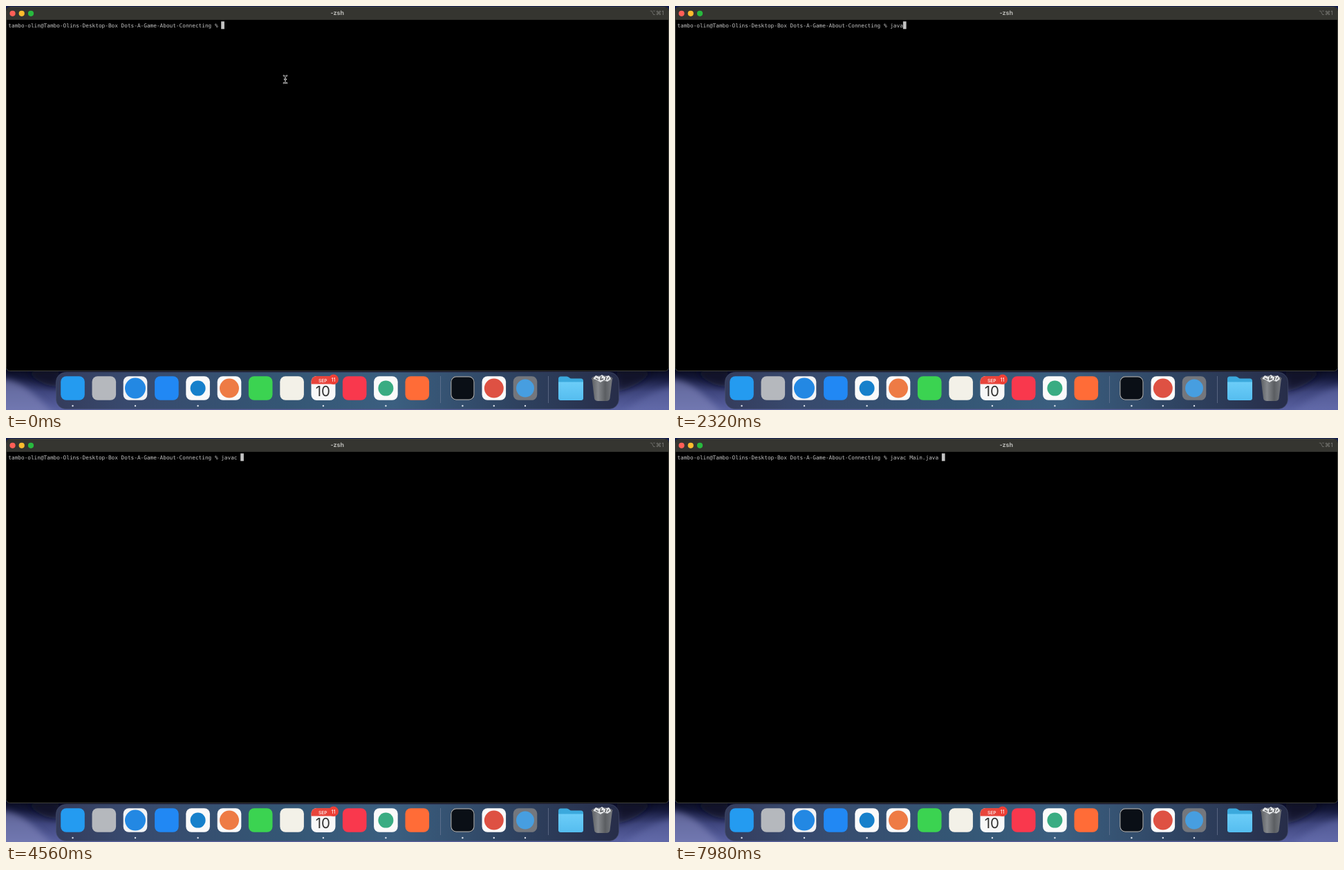
Recreate the animation shown at these times as an HTML page. Size 959 by 584 pixels, loop 8000 ms.

```html
<!DOCTYPE html>
<html lang="en">
<head>
<meta charset="utf-8">
<title>Terminal</title>
<style>
  html, body { margin: 0; width: 100%; height: 100%; overflow: hidden; background: #000; }
  svg { display: block; width: 100vw; height: 100vh; }
  text { text-rendering: geometricPrecision; }
  .mono { font: 7.75px "DejaVu Sans Mono", monospace; fill: #c3c3c3; white-space: pre; }
  .ui { font-family: Inter, sans-serif; text-anchor: middle; }
</style>
</head>
<body>
<svg viewBox="0 0 959 584" preserveAspectRatio="none">
  <defs>
    <linearGradient id="sky" x2="0" y2="1">
      <stop offset="0" stop-color="#0a0c20"/>
      <stop offset=".2" stop-color="#14183a"/>
      <stop offset=".55" stop-color="#3f467e"/>
      <stop offset="1" stop-color="#5a62a2"/>
    </linearGradient>
    <linearGradient id="dock">
      <stop offset="0" stop-color="#343c5c"/>
      <stop offset=".12" stop-color="#38496d"/>
      <stop offset=".4" stop-color="#345674"/>
      <stop offset=".6" stop-color="#3b5f80"/>
      <stop offset=".8" stop-color="#2f4462"/>
      <stop offset="1" stop-color="#272d49"/>
    </linearGradient>
    <linearGradient id="bin">
      <stop offset="0" stop-color="#5c5f63"/>
      <stop offset=".3" stop-color="#85888c"/>
      <stop offset=".65" stop-color="#5b5e62"/>
      <stop offset="1" stop-color="#787b80"/>
    </linearGradient>
    <linearGradient id="folder" x2="0" y2="1">
      <stop offset="0" stop-color="#6ccdf8"/>
      <stop offset="1" stop-color="#55bdef"/>
    </linearGradient>
    <filter id="blur" x="-50%" y="-50%" width="200%" height="200%"><feGaussianBlur stdDeviation="5"/></filter>
    <clipPath id="page"><rect x="441.5" y="535" width="35" height="35" rx="8"/></clipPath>
  </defs>

  <rect width="959" height="584" fill="#101a4c"/>
  <rect y="526" width="959" height="58" fill="url(#sky)"/>
  <g filter="url(#blur)">
    <path d="M-10 538Q14 540 34 556T70 592H-10Z" fill="#7f84b8" opacity=".65"/>
    <path d="M30 528H76V550Q52 552 30 528Z" fill="#0b0d22" opacity=".7"/>
    <path d="M884 528H934Q918 550 884 558Z" fill="#0b0d22" opacity=".7"/>
    <path d="M892 592Q918 562 970 548V592Z" fill="#6a72b0" opacity=".5"/>
  </g>

  <rect x=".5" y="1.5" width="958" height="526" rx="5" fill="#000" stroke="#3f403b"/>
  <path d="M1 20V7Q1 2 6 2H953Q958 2 958 7V20Z" fill="#353530"/>
  <circle cx="9.5" cy="10.8" r="4.1" fill="#ff5f57"/>
  <circle cx="22.7" cy="10.8" r="4.1" fill="#febc2e"/>
  <circle cx="36" cy="10.8" r="4.1" fill="#28b93e"/>
  <text class="ui" x="479.2" y="13.4" font-size="8.8" font-weight="700" fill="#b9b9b5">-zsh</text>
  <text x="931" y="13" font-size="8.5" font-family="Inter, 'DejaVu Sans', sans-serif" fill="#7d7d79">⌥⌘1</text>

  <text class="mono" x="3.3" y="30.8">tambo-olin@Tambo-Olins-Desktop-Box Dots-A-Game-About-Connecting %</text>
  <text class="mono" id="typed" x="311.2" y="30.8"></text>
  <rect id="caret" y="22.3" width="4.7" height="11" fill="#c3c3c3"/>
  <g id="pointer" fill="none" stroke-linecap="round">
    <path id="beam" d="M401.7 100.6L404 102L406.3 100.6M404 102V110M401.7 111.4L404 110L406.3 111.4M402.8 106H405.2" stroke="#c9c9c9" stroke-width="2"/>
    <path d="M401.9 100.7L404 102L406.1 100.7M404 102V110M401.9 111.3L404 110L406.1 111.3" stroke="#111" stroke-width=".8"/>
  </g>

  <rect x="72.5" y="529.5" width="814" height="53" rx="14" fill="url(#dock)" stroke="#46506e" stroke-opacity=".6"/>
  <path d="M628.5 535V574M784.5 535V574" stroke="#76809c" stroke-opacity=".6"/>
  <g id="tiles"></g>

  <g clip-path="url(#page)">
    <rect x="441" y="535" width="36" height="36" fill="#f8f8f8"/>
    <rect x="441" y="535" width="36" height="11.5" fill="#e8453c"/>
  </g>
  <text class="ui" x="458.3" y="543.7" font-size="6.6" font-weight="500" fill="#fff">SEP</text>
  <text class="ui" x="458.3" y="564.4" font-size="20.5" fill="#303030">10</text>
  <circle cx="473.8" cy="539.8" r="7.2" fill="#ee4036"/>
  <text class="ui" x="473.6" y="542.6" font-size="7.8" fill="#fff">11</text>

  <path d="M799 539Q799 535.5 802.5 535.5H811Q813 535.5 814.5 537T818 538.5H831.5Q835 538.5 835 542V566Q835 569.5 831.5 569.5H802.5Q799 569.5 799 566Z" fill="#3ba9dd"/>
  <path d="M799 543.5H835V566.5Q835 570 831.5 570H802.5Q799 570 799 566.5Z" fill="url(#folder)"/>

  <path d="M847.5 538.5H877L873.5 567Q873 571 868 571H856.5Q851.5 571 851 567Z" fill="url(#bin)"/>
  <ellipse cx="862.2" cy="538.5" rx="14.8" ry="3.8" fill="#3f4247" stroke="#8d9094" stroke-width=".8"/>
  <path d="M849 539L853 534L858 536L862 533L866 536L872 534L875.5 539L870 543L865 541L860 544L855 541Z" fill="#e1e3e5"/>
  <path d="M853 538L857 540M861 535L860 540L864 539M868 536L867 541M872 537L870 540" stroke="#4b4e52" stroke-width="1.3" fill="none"/>
</svg>
<script>
const LOOP = 8000, CHAR = 4.666, START_X = 311.2;
const byId = id => document.getElementById(id);

// [centre x, tile colour, running, disc colour, disc radius]
const apps = [
  [96.5, '#249bf0', true],
  [141.8, '#b5b8bd'],
  [187, '#f2f3f5', true, '#2388e3', 15],
  [232.4, '#2188f4'],
  [277.6, '#fafafa', true, '#1680cb', 11],
  [323, '#fafafa', false, '#ee7b45', 14],
  [368.2, '#3bd351'],
  [413.6, '#f3f1e8'],
  [458.9, null, true],
  [504.2, '#f9384d'],
  [549.4, '#fafafa', true, '#39ac82', 11],
  [594.8, '#ff6c37'],
  [660.4, '#0a0f16', true],
  [705.8, '#fafafa', true, '#de5143', 14],
  [751, '#74777d', true, '#479ee0', 13]
];
byId('tiles').innerHTML = apps.map(([x, tile, running, disc, r]) =>
  (tile ? `<rect x="${x - 17.3}" y="535.2" width="34.6" height="34.6" rx="8" fill="${tile}"/>` : '') +
  (disc ? `<circle cx="${x}" cy="552.6" r="${r}" fill="${disc}"/>` : '') +
  (running ? `<circle cx="${x}" cy="578" r="1.2" fill="#dce1ec"/>` : '')
).join('') +
  '<rect x="643.8" y="535.9" width="33.2" height="33.2" rx="7.5" fill="none" stroke="#a9adb1" stroke-width="1.2"/>';

const command = 'javac Main.java ';
// [time, characters shown]; the last step is a tab completion
const keys = [[0, 0], [220, 1], [360, 2], [500, 3], [640, 4], [2960, 5],
  [4300, 6], [5000, 7], [6040, 8], [6900, 9], [7500, 16]];

function draw(now) {
  const t = now % LOOP;
  const count = keys.filter(([at]) => at <= t).pop()[1];
  byId('typed').textContent = command.slice(0, count);
  byId('caret').setAttribute('x', START_X + count * CHAR);
  byId('pointer').style.display = count ? 'none' : '';
}

const start = performance.now();
function tick() {
  draw(performance.now() - start);
  requestAnimationFrame(tick);
}
tick();
</script>
</body>
</html>
```
